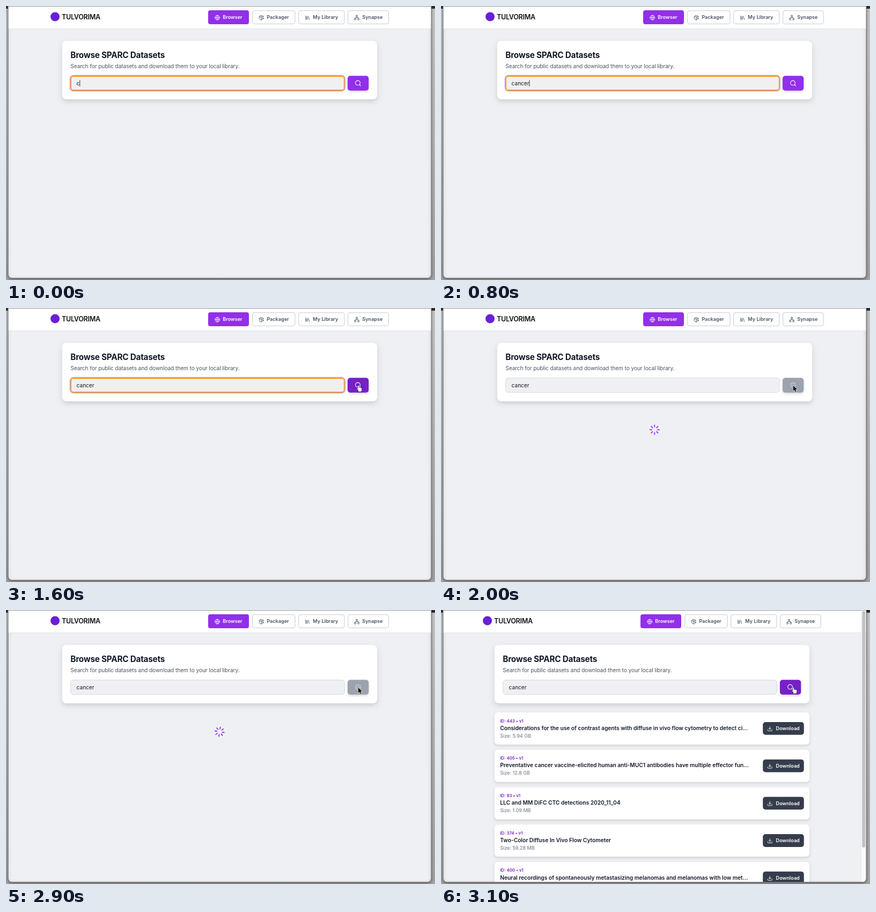
Write an HTML page with a canvas that moves like this. It is 800 px wide and 511 px high and loops after 3200 ms.

```html
<!DOCTYPE html>
<html lang="en">
<head>
<meta charset="utf-8">
<title>Dataset browser</title>
<style>
html, body { margin: 0; width: 100%; height: 100%; overflow: hidden; background: #b4b4b6; }
canvas { display: block; width: 800px; height: 511px; }
</style>
</head>
<body>
<canvas id="stage"></canvas>
<script>
const LOOP = 3200, STEP = 100;
const LOAD = 1750, DONE = 2950;
const PURPLE = [145, 47, 233], HOVER = [119, 31, 200], GRAY = [156, 163, 175];
const INK = '#111827', SLATE = '#4b5563';

const canvas = document.getElementById('stage');
const ctx = canvas.getContext('2d');
const ratio = window.devicePixelRatio || 1;
canvas.width = 800 * ratio;
canvas.height = 511 * ratio;

const box = (x, y) => `M${x} ${y}h4a1 1 0 0 1 1 1v4a1 1 0 0 1-1 1h-4a1 1 0 0 1-1-1v-4a1 1 0 0 1 1-1z`;
const icons = {
  globe: 'M22 12a10 10 0 1 1-20 0a10 10 0 1 1 20 0M12 2a14.5 14.5 0 0 0 0 20 14.5 14.5 0 0 0 0-20M2 12h20',
  pack: 'M16 16h6M19 13v6M21 10V8a2 2 0 0 0-1-1.73l-7-4a2 2 0 0 0-2 0l-7 4A2 2 0 0 0 3 8v8a2 2 0 0 0 1 1.73l7 4a2 2 0 0 0 2 0l2-1.14M7.5 4.27l9 5.15M3.29 7L12 12l8.71-5M12 22V12',
  books: 'M16 6l4 14M12 6v14M8 8v12M4 4v16',
  network: box(17, 16) + box(3, 16) + box(10, 2) + 'M5 16v-3a1 1 0 0 1 1-1h12a1 1 0 0 1 1 1v3M12 12V8',
  search: 'M19 11a8 8 0 1 1-16 0a8 8 0 1 1 16 0M21 21l-4.35-4.35',
  download: 'M21 15v4a2 2 0 0 1-2 2H5a2 2 0 0 1-2-2v-4M7 10l5 5 5-5M12 15V3',
  loader: 'M12 2v4M16.2 7.8l2.9-2.9M18 12h4M16.2 16.2l2.9 2.9M12 18v4M4.9 19.1l2.9-2.9M2 12h4M4.9 4.9l2.9 2.9'
};
for (const key in icons) icons[key] = new Path2D(icons[key]);

const arrow = new Path2D('M0 0V10.6L2.5 8.3L4.1 12L5.9 11.2L4.3 7.6H7.6Z');
const hand = new Path2D('M-.9 .2Q0-.9 .9 .2V4Q2 3.3 2.7 4.3Q3.8 3.7 4.4 4.7Q5.8 4.2 6 5.8V8.2Q5.9 9.6 5 11.2H-.2Q-1-.1 -1 8.6L-3 6.5Q-3 4.8-1.6 5.5L-.9 6.2Z');

const nav = [
  ['Browser', 'globe', 377, 76],
  ['Packager', 'pack', 459, 80],
  ['My Library', 'books', 545, 86],
  ['Synapse', 'network', 637, 76.5]
];
const results = [
  [443, 'Considerations for the use of contrast agents with diffuse in vivo flow cytometry to detect ci...', '5.94 GB'],
  [405, 'Preventative cancer vaccine-elicited human anti-MUC1 antibodies have multiple effector fun...', '12.8 GB'],
  [93, 'LLC and MM DiFC CTC detections 2020_11_04', '1.09 MB'],
  [374, 'Two-Color Diffuse In Vivo Flow Cytometer', '59.28 MB'],
  [400, 'Neural recordings of spontaneously metastasizing melanomas and melanomas with low met...', '2.47 GB']
];

const clamp = v => Math.max(0, Math.min(1, v));
const rgb = c => `rgb(${c.map(Math.round)})`;
const mix = (a, b, k) => a.map((v, i) => v + (b[i] - v) * clamp(k));

function text(str, x, y, size, weight, color, spacing = 0) {
  ctx.font = `${weight} ${size}px Inter, sans-serif`;
  ctx.letterSpacing = spacing * size + 'px';
  ctx.fillStyle = color;
  ctx.fillText(str, x, y);
}

function panel(x, y, w, h, r, fill, stroke, line = 1) {
  ctx.beginPath();
  ctx.roundRect(x, y, w, h, r);
  if (fill) { ctx.fillStyle = fill; ctx.fill(); }
  if (stroke) { ctx.strokeStyle = stroke; ctx.lineWidth = line; ctx.stroke(); }
}

function raised(blur, dy, alpha, draw) {
  ctx.save();
  ctx.shadowColor = `rgba(0,0,0,${alpha})`;
  ctx.shadowBlur = blur * ratio;
  ctx.shadowOffsetY = dy * ratio;
  draw();
  ctx.restore();
}

function icon(name, cx, cy, size, color, angle = 0) {
  ctx.save();
  ctx.translate(cx, cy);
  ctx.rotate(angle);
  ctx.scale(size / 24, size / 24);
  ctx.translate(-12, -12);
  ctx.lineWidth = 2;
  ctx.lineCap = ctx.lineJoin = 'round';
  ctx.strokeStyle = color;
  ctx.stroke(icons[name]);
  ctx.restore();
}

function pointer(shape, x, y, fill, edge) {
  ctx.save();
  ctx.translate(x, y);
  ctx.lineJoin = 'round';
  ctx.lineWidth = 1.3;
  ctx.strokeStyle = edge;
  ctx.stroke(shape);
  ctx.fillStyle = fill;
  ctx.fill(shape);
  ctx.restore();
}

function desktop() {
  const side = ctx.createLinearGradient(0, 0, 0, 511);
  side.addColorStop(0, '#c9c9ca');
  side.addColorStop(1, '#a5a5a7');
  ctx.fillStyle = side;
  ctx.fillRect(0, 0, 800, 511);
  ctx.fillStyle = '#303032';
  ctx.fillRect(0, 0, 800, 5);
  raised(6, 2, 0.4, () => panel(4, -8, 789, 515.5, 7, '#eff0f4', '#707073'));
}

function header() {
  ctx.fillStyle = '#fff';
  ctx.fillRect(4.5, 0, 788, 42);
  ctx.fillStyle = '#dfe1e6';
  ctx.fillRect(4.5, 42, 788, 1);
  ctx.fillStyle = '#77777a';
  ctx.fillRect(4, 0, 789, 0.8);
}

function brandAndNav() {
  ctx.beginPath();
  ctx.arc(91.5, 20, 8.5, 0, 7);
  ctx.fillStyle = '#6a1fd8';
  ctx.fill();
  text('TULVORIMA', 104, 24.5, 12.5, 600, '#111', -0.02);
  nav.forEach(([label, name, x, w], i) => {
    const color = i ? SLATE : '#fff';
    if (i) panel(x + 0.6, 8.6, w - 0.7, 24.8, 4, '#fff', '#d1d5db', 1.3);
    else panel(x, 8, w, 26, 4, rgb(PURPLE));
    icon(name, x + 17.2, 21.7, 10.5, color);
    text(label, x + 27.3, 24.4, 9.1, 600, color);
  });
}

function searchCard(t, focused, loading, typed, caret, button, spin) {
  raised(10, 4, 0.14, () => panel(104.7, 65, 587.5, 109, 8, '#fff'));
  text('Browse SPARC Datasets', 120.3, 96.7, 15.25, 700, INK, -0.014);
  text('Search for public datasets and download them to your local library.', 120.3, 115.8, 10.15, 400, SLATE, -0.007);

  if (focused) {
    panel(119.3, 129.3, 513, 29.4, 6, '#fff', '#a970e8', 0.9);
    panel(121, 131, 509.8, 26, 4.5, '#f0f0f1', '#f09a2c', 1.8);
  } else {
    panel(120.6, 130.6, 510.8, 26.8, 5, '#eff0f3', '#d6d9df');
  }
  text(typed, 131.6, 147.9, 10.1, 400, INK);
  if (caret) {
    const end = 131.6 + ctx.measureText(typed).width;
    ctx.fillStyle = '#111';
    ctx.fillRect(end, 138.3, 0.8, 12);
  }

  raised(4, 2, 0.16, () => panel(637, 130.3, 39.3, 27.4, 5, rgb(button)));
  if (loading) icon('loader', 656.6, 144, 13.1, '#e8eaed', spin);
  else icon('search', 656.6, 144, 13.1, '#fff');
}

function resultCard([id, title, size], i) {
  const y = 191 + i * 69.7;
  raised(5, 2, 0.14, () => panel(104.7, y, 587.5, 60, 6, '#fff'));
  text(`ID: ${id} • v1`, 115.2, y + 18.6, 7.8, 600, rgb(HOVER));
  text(title, 115.2, y + 32.7, 10.2, 600, INK);
  text(`Size: ${size}`, 115.2, y + 46.5, 9.05, 400, '#6b7280');
  panel(605.2, y + 18, 76.6, 23.8, 5, '#353d4c');
  icon('download', 618.3, y + 30.5, 10.5, '#fff');
  text('Download', 629.6, y + 33.3, 9.15, 600, '#fff');
}

function scrollbar() {
  ctx.fillStyle = '#fafafa';
  ctx.fillRect(783.5, 0.8, 9, 506.5);
  ctx.fillStyle = '#e6e6e8';
  ctx.fillRect(783, 0.8, 0.8, 506.5);
  panel(785.3, 2, 5.8, 441, 3, '#c1c1c3');
}

function typedAt(t) {
  const keys = [0, 100, 200, 600, 700, 800];
  return 'cancer'.slice(0, keys.filter(k => t >= k).length);
}

function render(t) {
  const done = t >= DONE, loading = t >= LOAD && !done, focused = t < LOAD;
  const moving = t >= 1000;
  const glide = 1 - (1 - clamp((t - 1000) / 400)) ** 2;
  const mx = 680 - 23.3 * glide, my = 149 - 4.5 * glide;
  const over = moving && mx < 676;

  let button = over ? mix(PURPLE, HOVER, (t - 1000) / 150) : PURPLE;
  if (loading) button = mix(HOVER, GRAY, (t - LOAD) / 150);
  if (done) button = mix(GRAY, HOVER, (t - DONE) / 150);
  const spin = (t - LOAD) / 1000 * Math.PI * 2;

  ctx.setTransform(ratio, 0, 0, ratio, 0, 0);
  desktop();
  ctx.save();
  ctx.beginPath();
  ctx.roundRect(4.5, -8, 788, 515, 6);
  ctx.clip();
  header();
  ctx.save();
  if (done) ctx.translate(-5, 0);
  brandAndNav();
  searchCard(t, focused, loading, typedAt(t), focused && t < 1300, button, spin);
  if (done) results.forEach(resultCard);
  ctx.restore();
  if (done) scrollbar();
  if (loading) icon('loader', 398.3, 227, 21, rgb(PURPLE), spin);
  ctx.restore();

  if (over && !loading) pointer(hand, mx + 0.6, my, '#fff', '#222');
  else if (moving) pointer(arrow, mx, my, '#111', '#fff');
}

function tick(now) {
  render(Math.floor((now % LOOP) / STEP) * STEP);
  requestAnimationFrame(tick);
}
requestAnimationFrame(tick);
</script>
</body>
</html>
```
